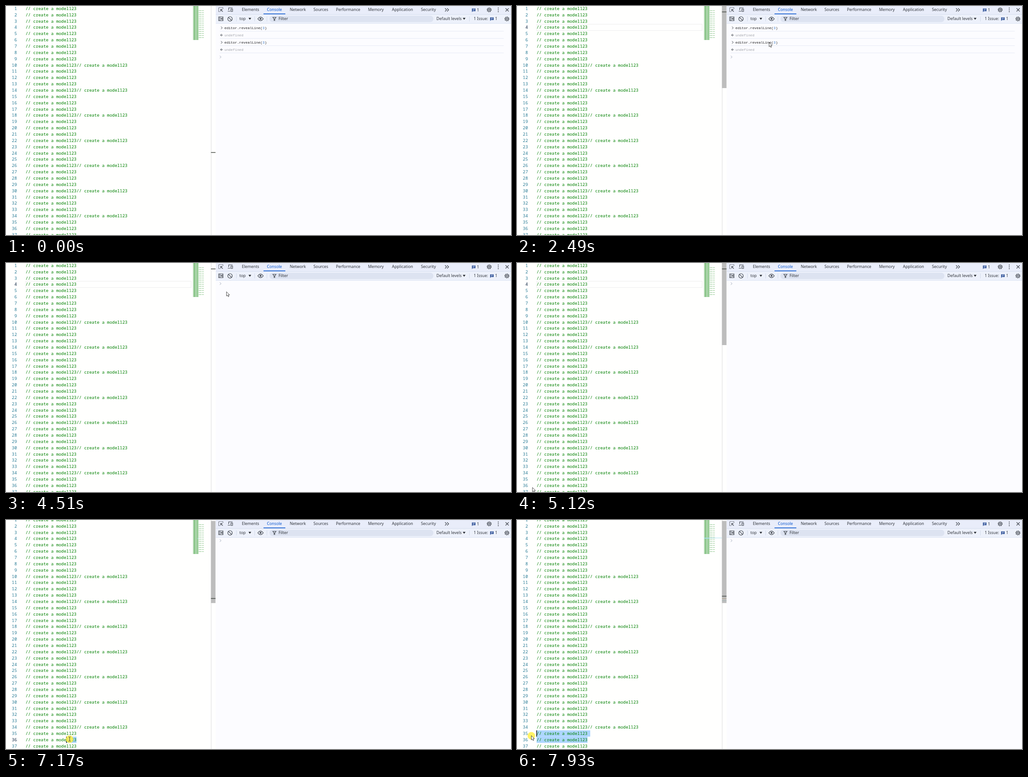
An HTML page that plays this animation: 1110 by 505 pixels, repeating every 7990 ms.

```html
<!DOCTYPE html>
<html lang="en">
<head>
<meta charset="utf-8">
<style>
  html, body { margin: 0; width: 100%; height: 100%; overflow: hidden; background: #fffffe; }
  svg { display: block; width: 1110px; height: 505px; }
  .code { font: 9.33px "Noto Sans Mono", monospace; fill: #008000; }
  .num { fill: #237893; text-anchor: end; }
  .ui { font: 8.8px "Noto Sans", "Open Sans", sans-serif; fill: #30343b; }
  .mid { text-anchor: middle; }
  .log { font: 7.75px "Liberation Mono", monospace; fill: #222; }
  .icon { fill: none; stroke: #41464e; stroke-width: 1.2; }
</style>
</head>
<body>
<svg id="stage" viewBox="0 0 1110 505"></svg>
<script>
const LOOP = 7990, PITCH = 13.86, CHAR = 5.6, LEFT = 43, MINI = 1.14;
const END = LEFT + 20 * CHAR, CODE = '// create a model123';
const el = id => document.getElementById(id);

const rect = (x, y, w, h, fill, more = '') =>
  `<rect x="${x}" y="${y}" width="${w}" height="${h}" fill="${fill}" ${more}/>`;
const text = (x, y, str, cls, more = '') => `<text x="${x}" y="${y}" class="${cls}" ${more}>${str}</text>`;
const icon = (d, more = '') => `<path class="icon" d="${d}" ${more}/>`;
const rowTop = n => (n - 1) * PITCH - 1.4;
const isLong = n => n >= 10 && n % 4 === 2;
const lines = Array.from({ length: 38 }, (_, i) => i + 1);

function minimap() {
  const words = [[0, 2, .3], [3, 9, .5], [10, 11, .45], [12, 20, .38]];
  let out = rect(411, 0, 12, 75, '#008000', 'opacity=".15"');
  for (const [a, b, o] of words) {
    const w = (b - a) * .6;
    out += rect(411 + a * .6, 0, w, 75, '#008000', `opacity="${o * .75}"`);
    for (let n = 10; n < 66; n += 4)
      out += rect(423 + a * .6, (n - 1) * MINI - .5, w, 1.1, '#008000', `opacity="${o}"`);
  }
  return out;
}

function gear(x, y) {
  return `<circle class="icon" cx="${x}" cy="${y}" r="3.5"/><circle class="icon" cx="${x}" cy="${y}" r="1.2"/>` +
    `<circle class="icon" cx="${x}" cy="${y}" r="4.7" stroke-dasharray="1.85 1.84"/>`;
}

const bubble = (x, y) =>
  `<path d="M${x - 4} ${y - 3.5}h8v6h-6l-2 2z" fill="#3f5f9f"/>` +
  icon(`M${x - 2} ${y - 1.7}h4.5M${x - 2} ${y + .4}h3`, 'style="stroke:#eef2ff;stroke-width:.8"');
const triangle = (x, y) => `<path d="M${x - 3} ${y - 2}h6l-3 4.5z" fill="#30343b"/>`;

function tools() {
  const tabs = [['Elements', 537.5], ['Console', 590], ['Network', 641.5], ['Sources', 692],
    ['Performance', 752], ['Memory', 813], ['Application', 871.5], ['Security', 928.5]];
  let out = rect(461, 0, 649, 505, '#fcfcff') + rect(461, 0, 649, 18, '#e9edfa') +
    rect(461, 18, 649, 20, '#edf1fb') + rect(461, 18, 649, 1, '#d6deef') + rect(461, 38, 649, 1, '#dde4f3');
  for (const [label, x] of tabs)
    out += text(x, 11.2, label, 'ui mid', label === 'Console' ? 'style="fill:#0b57d0"' : '');
  out += rect(566, 16.6, 48, 1.6, '#0b57d0');
  // top bar
  out += icon('M477 6V3.5H467.5V12.5H470.5', 'stroke-dasharray="1.5 1"') +
    icon('M476.5 12.5L472 8M472 11.5V7.5H476') +
    icon('M489.5 9V4H498M487.5 11.5H493M494.5 6.5H498V12H494.5Z') +
    icon('M965 5l3.5 3.5l-3.5 3.5M969.5 5l3.5 3.5l-3.5 3.5') +
    bubble(1028, 9) + text(1035, 12.2, '1', 'ui') + gear(1062, 8.5) +
    [4.5, 8.5, 12.5].map(y => `<circle cx="1082" cy="${y}" r="1.1" fill="#41464e"/>`).join('') +
    icon('M1098 5l7 7M1105 5l-7 7');
  // filter bar
  out += icon('M467.5 24h9.5v8.5h-9.5zM470.3 24v8.5M472.5 28.2l2.5-1.8v3.6z') +
    icon('M488.8 24.8l7.2 7.2') + '<circle class="icon" cx="492.4" cy="28.4" r="4.9"/>' +
    [506, 546, 573, 1018].map(x => rect(x, 23, 1, 11, '#d3daea')).join('') +
    text(513, 31.3, 'top', 'ui') + triangle(536, 28) +
    icon('M553.5 28.3q6-8 12 0q-6 8-12 0z') + '<circle cx="559.5" cy="28.3" r="2" fill="#41464e"/>' +
    rect(579, 21.5, 360.5, 14, '#dde3f1', 'rx="7"') +
    icon('M586.5 25h7l-2.7 3.5v3.5h-1.6v-3.5z') + text(599, 31.3, 'Filter', 'ui') +
    text(946, 31.3, 'Default levels', 'ui') + triangle(1007, 28) +
    text(1028, 31.3, '1 Issue:', 'ui') + bubble(1068, 28.5) + text(1075, 31.3, '1', 'ui') + gear(1101, 28.5);
  return out;
}

function log() {
  let out = '';
  for (const y of [48, 80]) {
    out += icon(`M472.5 ${y - 2.5}l3 2.7l-3 2.7`, 'style="stroke-width:1"') +
      text(480, y + 2.7, 'editor.revealLine(<tspan fill="#3b78c4">3</tspan>)', 'log') +
      icon(`M474 ${y + 13.5}l-2.5 2.7l2.5 2.7M472 ${y + 16.2}h4.5`, 'style="stroke-width:1"') +
      text(480, y + 18.7, 'undefined', 'log', 'style="fill:#a2a4aa"') +
      rect(470, y + 7, 624, 1, '#e6eaf5') + rect(470, y + 23, 624, 1, '#e6eaf5');
  }
  return out;
}

el('stage').innerHTML = '<g id="under"></g><g id="code">' + lines.map(n =>
    text(LEFT, rowTop(n) + 10.2, isLong(n) ? CODE + CODE : CODE, 'code') +
    text(24, rowTop(n) + 10.2, n, 'code num', `id="n${n}"`)).join('') + '</g>' +
  minimap() + rect(450.5, 0, 1, 505, '#dcdcdc') +
  rect(450.5, 0, 10, 181, '#bdbdbd', 'id="slider"') + tools() + `<g id="log">${log()}</g>` +
  '<g id="prompt">' + icon('M470 -2.5l2.7 2.7l-2.7 2.7', 'style="stroke:#9aa3b5;stroke-width:1"') + '</g>' +
  '<g id="over"></g>';

// time, x, y of the pointer's hot spot
const path = [[450, 650, 90], [1050, 306, 140], [1450, 306, 140], [1860, 200, 46], [2210, 200, 46],
  [2490, 554, 80], [2700, 566, 128], [2960, 540, 95], [3030, 535, 90], [3500, 491.5, 29],
  [3830, 491.5, 29], [4110, 486, 62], [4510, 486, 62], [4780, 121, 436], [5050, 45, 488],
  [5120, 34, 495], [5650, 16, 488], [6140, 16, 488], [6770, 180, 485], [7040, 180, 485],
  [7450, 54, 479], [7590, 31, 477], [7790, 31, 477], [7930, 31.5, 475.5]];
const presses = [[1860, 2060], [3560, 3760], [5720, 6210], [6800, LOOP]];
const consoleCaret = [[3760, 4060], [4560, 5060], [5560, 5780]];
const within = (spans, t) => spans.some(([a, b]) => t >= a && t < b);
const clamp = v => Math.max(0, Math.min(1, v));

function pointerAt(t) {
  const i = path.findIndex(p => p[0] > t);
  if (i < 0) return path[path.length - 1].slice(1);
  const [a, b] = [path[i - 1], path[i]], k = (t - a[0]) / (b[0] - a[0]);
  return [a[1] + (b[1] - a[1]) * k, a[2] + (b[2] - a[2]) * k];
}

function editorAt(t) {
  if (t < 1900) return { line: 66, sel: [] };
  if (t < 5780) return { line: 4, active: 4, sel: [], caret: t < 2430 || (t >= 2930 && t < 3430) ? END : 0 };
  if (t < 6840) return { line: 37, sel: [[36, LEFT, END + 6]], caret: t < 6300 ? LEFT : 0 };
  if (t < 7050) return { line: 36, active: 36, sel: [], caret: END };
  if (t < 7560) {
    const x = END - Math.round((t - 7050) / 400 * 14) * CHAR;
    return { line: 36, active: 36, sel: [[36, x, END]], caret: x, match: t >= 7250 };
  }
  return { line: 35, sel: [[35, LEFT, END + 6], [36, LEFT, END]], caret: LEFT };
}

function pointer(t) {
  if (t < 450) return '';
  const [x, y] = pointerAt(t);
  const beam = x < 450 && (x > 42 || x < 20);
  const halo = within(presses, t) ? `<circle cx="${x}" cy="${y + .3}" r="8.3" fill="#fff04a" opacity=".85"/>` : '';
  return halo + `<g transform="translate(${x} ${y})">` + (beam
    ? icon('M-2.5 -5q2.5 0 2.5 1.5V3.5q0 1.5 -2.5 1.5M2.5 -5q-2.5 0 -2.5 1.5M0 3.5q0 1.5 2.5 1.5',
      'style="stroke:#333;stroke-width:.9"')
    : '<path d="M0 0V9.5L2.2 7.5L3.8 11L5.4 10.3L3.9 6.9H6.8Z" fill="#fff" stroke="#222" stroke-width=".8"/>') + '</g>';
}

function draw(t) {
  const s = editorAt(t), scrolled = t < 5780 ? 0 : 6, cleared = t >= 3760;
  const sliderOn = t < 2850 ? clamp((t - 800) / 100) : t < 4500 ? clamp((3600 - t) / 750) : clamp((t - 4580) / 100);
  const box = (n, a, b, fill) => rect(a, rowTop(n) - scrolled, b - a, PITCH, fill);

  let under = '';
  if (s.active && !s.sel.length)
    under += rect(LEFT, rowTop(s.line) - scrolled, 364, PITCH, 'none', 'stroke="#ececec"');
  if (s.match) for (const n of lines) {
    under += box(n, s.caret, END, '#e4eefb');
    if (isLong(n)) under += box(n, s.caret + 20 * CHAR, END + 20 * CHAR, '#e4eefb');
  }
  for (const [n, a, b] of s.sel) under += box(n, a, b, '#add6ff');
  el('under').innerHTML = under;

  el('code').setAttribute('transform', `translate(0 ${-scrolled})`);
  for (const n of lines) el('n' + n).style.fill = n === s.active ? '#0b2340' : '';
  el('slider').setAttribute('y', scrolled * .358);
  el('slider').setAttribute('opacity', sliderOn);
  el('log').style.display = cleared ? 'none' : '';
  el('prompt').setAttribute('transform', `translate(0 ${cleared ? 45.3 : 112.3})`);

  const mark = (n, fill, h = 1.5) => rect(450.5, 12.3 + 5 * (n - 4), 10, h, fill);
  let over = '';
  for (const [n, a, b] of s.sel) {
    const x = 411 + (a - LEFT) / CHAR * .6, right = b > END ? 450 : 423;
    over += rect(x, (n - 1) * MINI + .2, right - x, 1.2, '#a8e2f2', 'opacity=".8"');
  }
  if (s.match || s.line === 35) over += mark(37, '#a3b5b5', 1) + mark(36, '#b5a58c', 1);
  over += mark(s.line, '#4a4f4a');
  if (s.caret) over += rect(s.caret - .5, rowTop(s.line) - scrolled, 1.5, PITCH, '#111');
  if (within(consoleCaret, t)) over += rect(479, 42, 1, 8, '#333');
  el('over').innerHTML = over + pointer(t);
}

function tick() {
  draw(performance.now() % LOOP);
  requestAnimationFrame(tick);
}
tick();
</script>
</body>
</html>
```
